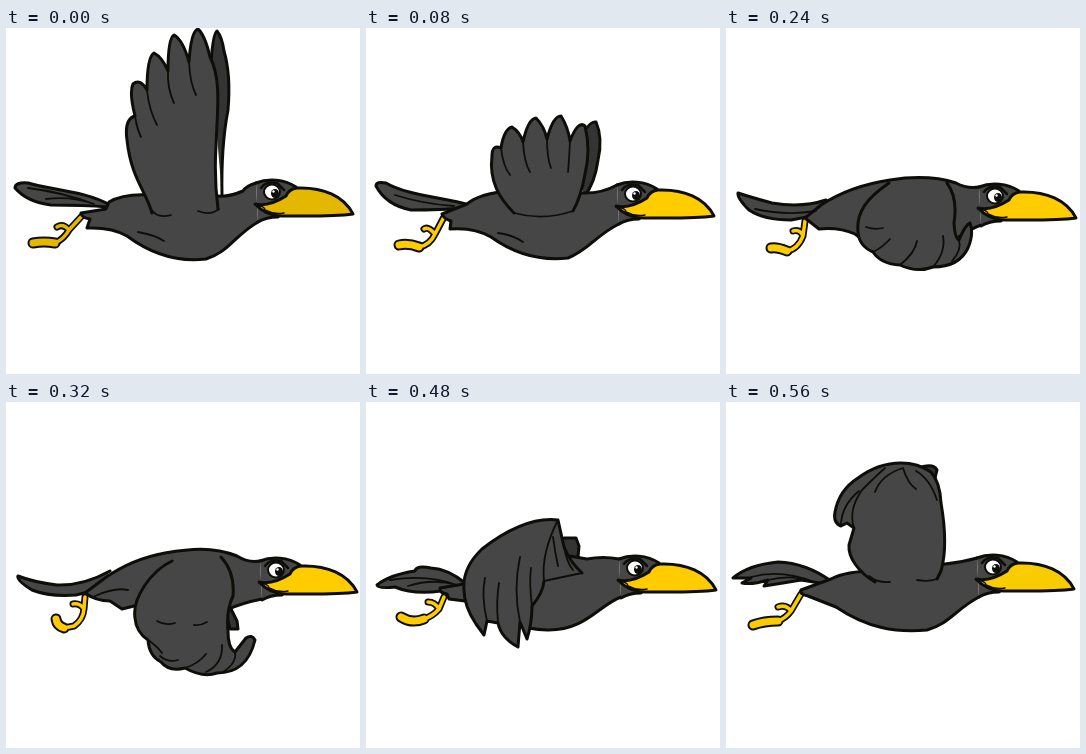
These frames come from a looping animation (354 by 346 pixels, 640 ms). An HTML page:

```html
<!DOCTYPE html>
<html lang="en">
<head>
<meta charset="utf-8">
<title>Flying crow</title>
<style>
  html, body { margin: 0; width: 100%; height: 100%; overflow: hidden; background: #fff; }
  svg { display: block; width: 100%; height: 100%; }
  path { stroke-linecap: round; stroke-linejoin: round; }
</style>
</head>
<body>
<svg id="stage" viewBox="0 0 354 346"></svg>
<script>
const STEP = 80, INK = '#0d0d09', PLUME = '#464646', SHADE = '#343434';

// Open outlines hide the joins between body parts; fills close them.
const poses = [
  { // wings fully raised
    head: [0, 0], beak: '#e5b800',
    far: 'M205 35Q207 5 211 3Q216 9 218 23Q225 47 222 82Q215 118 216 168',
    tail: 'M104 177C80 163 45 162 22 155Q9 154 9 160Q21 174 45 177Q78 177 102 179',
    body: 'M250 155Q240 158 237 163Q223 169 212 168L145 167Q118 165 103 174L100 181L75 185Q76 190 84 191L81 200Q106 199 121 208C148 228 175 234 200 231C223 224 228 208 252 194',
    wing: 'M146 185C140 163 125 150 121 112Q118 91 129 88Q123 64 127 56Q134 50 141 62Q141 29 148 25Q156 29 162 43Q162 10 168 7Q177 12 183 34Q185 3 192 1Q199 7 204 29C216 52 211 85 210 118Q208 150 212 181',
    lines: 'M141 62Q143 82 151 97M162 43Q161 60 168 75M183 34Q184 55 190 67M129 88Q131 101 135 109M145 181Q151 191 165 187M192 183Q204 188 213 181M22 160Q55 164 88 176M40 171Q65 168 88 176M132 204Q149 207 158 213',
    leg: 'M75 189L63 202Q57 195 51 199M63 202Q58 211 49 215', sole: 'M49 215Q38 213 27 215'
  },
  { // wings sweeping forward and down
    head: [1, 2], beak: '#fc0',
    far: 'M210 120Q222 92 230 94Q237 110 232 132Q229 155 218 169',
    tail: 'M104 177C75 169 40 167 20 155Q10 153 10 158Q20 177 45 182Q75 182 101 180',
    body: 'M251 157Q235 166 215 165L145 163Q114 165 101 176L76 186Q78 191 85 193L84 201Q108 199 125 209C150 227 175 233 202 230C223 222 230 207 253 196',
    wing: 'M148 185C133 170 123 153 126 128Q126 116 135 120Q138 101 146 99Q154 104 157 114Q162 91 170 90Q178 98 181 111Q187 88 195 88Q202 99 204 113Q212 92 219 98Q225 122 219 146Q215 169 207 183',
    lines: 'M135 120Q137 138 144 147M157 114Q158 134 164 144M181 111Q181 130 185 140M204 113Q203 134 202 144M148 185Q177 193 207 183M29 167Q57 176 88 178M132 205Q147 207 157 214',
    leg: 'M78 189L69 206Q62 198 58 201M69 206Q64 217 53 219', sole: 'M53 219Q42 215 33 217'
  },
  { // wings level, tips curled up
    head: [1, 4], beak: '#fc0',
    far: 'M205 165Q211 151 219 150Q224 156 223 166',
    tail: 'M98 174Q75 179 47 171Q25 163 14 154Q10 154 14 162Q24 177 37 184Q60 189 91 183',
    body: 'M251 159Q243 157 235 162L205 158Q165 152 135 159Q104 164 88 178L80 185Q77 190 83 193L92 200Q113 201 127 205C153 224 176 231 204 228C224 222 232 203 253 198',
    wing: 'M137 160Q128 170 137 180C160 195 188 192 211 187Q236 187 244 173Q247 155 241 148Q237 147 233 161Q229 151 220 150Q224 157 220 164Q216 150 207 150Q208 155 205 159C175 152 155 156 137 160',
    lines: 'M137 160Q131 168 143 174Q154 180 170 179M156 180Q181 174 185 157Q192 177 174 188M174 188Q204 178 205 158Q215 171 195 187M195 187Q219 178 220 164Q225 178 213 187M213 187Q232 180 233 161M146 169Q157 167 168 172M147 187Q162 193 181 192M26 174Q55 182 89 178',
    leg: 'M80 190L74 207Q70 200 64 202M74 207Q70 219 61 220', sole: 'M61 220Q50 217 40 218'
  },
  { // wings starting downward
    head: [3, 4], beak: '#fc0',
    far: 'M222 205Q231 211 232 223L224 224L220 207',
    tail: 'M100 172Q76 180 46 175Q24 169 12 165Q11 170 23 182Q38 192 65 192L91 187',
    body: 'M253 159Q241 161 230 155Q202 146 164 152Q124 158 95 177L79 190L93 201Q113 199 129 206C154 226 180 229 203 226C225 218 233 205 255 197',
    wing: 'M163 155C141 170 130 184 132 204Q133 218 147 224Q155 236 174 237Q191 245 207 239Q233 239 242 220Q248 206 244 195Q239 197 233 212Q229 211 228 195Q232 170 221 155',
    lines: 'M147 224Q157 219 164 211M174 237Q189 225 191 213M207 239Q220 224 217 208M226 233Q236 222 233 212M140 199Q149 202 157 200M29 181Q60 188 90 183',
    leg: 'M79 193L77 208Q74 201 67 203M77 208Q72 221 61 223', sole: 'M61 223Q51 219 45 220'
  },
  { // wings pushing down, tips trailing forward
    head: [4, 4], beak: '#fc0',
    far: 'M225 207L231 219L232 227L224 227L220 211',
    tail: 'M104 169Q77 184 51 183Q27 180 12 174Q10 178 26 188Q44 195 70 193L94 187',
    body: 'M254 159Q242 161 231 154C206 144 183 147 159 151Q126 157 99 176L79 191Q90 199 104 199L116 207L132 203L223 207Q236 201 256 197',
    wing: 'M166 159C145 169 126 196 129 216Q130 230 142 238Q143 254 155 260Q163 270 179 266Q197 276 211 271C229 271 243 263 249 238Q246 232 240 236L229 250Q222 246 222 229Q220 209 227 194Q229 170 215 155',
    lines: 'M142 238Q151 244 156 251M154 254Q162 261 172 258M179 266Q192 262 200 252M200 270Q217 262 216 243M217 270Q231 261 229 250M151 219Q159 224 169 221M188 223Q194 224 201 220M89 194Q109 185 122 188M223 207Q228 204 231 204',
    leg: 'M79 195L78 207Q74 201 67 202M78 207Q77 218 68 224L58 226', sole: 'M58 226Q51 224 50 217'
  },
  { // wings fully lowered
    head: [4, 2], beak: '#fc0',
    far: 'M221 205Q217 240 217 280Q227 279 228 285Q224 292 211 291L210 220',
    tail: 'M109 172Q80 172 54 174Q21 177 8 184Q8 190 25 190Q54 194 80 189L105 183',
    body: 'M254 157Q241 159 230 152C207 141 183 142 159 147Q126 152 108 172L81 187L77 193Q88 197 96 198L105 203L132 203L222 207Q237 196 256 195',
    wing: 'M166 158C140 174 137 191 130 207Q121 229 125 240L130 248Q120 261 129 269L137 274C132 298 140 314 153 328Q161 330 164 321Q172 331 184 340L190 333Q200 340 212 336Q224 330 222 325L211 325Q209 303 211 280Q216 240 220 207Q225 174 213 155',
    lines: 'M130 248Q137 250 143 257M137 274Q141 283 146 287M164 321Q162 303 164 293M190 333Q183 315 184 303M152 240Q160 244 166 241M23 184Q65 180 98 181M24 188Q72 188 99 181M222 207L231 204',
    leg: 'M77 195L76 208Q72 202 66 203M76 208Q70 218 60 222', sole: 'M60 222L45 227'
  },
  { // wings folding back up
    head: [3, 2], beak: '#fc0',
    far: 'M193 142L198 136L210 136L213 144L212 155L219 164L197 166',
    tail: 'M99 181Q82 167 65 166Q50 163 49 169Q23 173 11 183Q12 187 29 185Q48 193 75 189L101 186',
    body: 'M253 157Q237 154 221 157L180 150L104 181L74 186Q73 191 81 192L83 197L99 199C129 213 147 227 181 228C219 229 233 203 255 195',
    wing: 'M216 171Q204 160 198 145L192 118C166 115 138 130 116 147Q96 166 98 188Q98 204 110 222L118 233L121 219L132 221Q135 236 152 245L154 220L161 237Q166 221 166 204Q177 191 178 179',
    lines: 'M192 118Q175 151 178 179M187 135Q189 150 192 164M198 145Q201 161 207 168M121 219Q115 193 119 176M132 221Q130 199 133 181M154 220Q147 187 154 155M166 204Q163 181 165 166M178 179Q192 176 216 171M24 178Q61 172 91 183M42 184Q67 176 91 183',
    leg: 'M78 195L73 207Q69 200 62 200M73 207Q67 214 58 217', sole: 'M58 217Q46 222 35 215'
  },
  { // wings rising
    head: [1, 1], beak: '#f8cc00',
    far: 'M190 67Q207 60 211 68L208 80L192 74',
    tail: 'M105 179Q80 161 52 160Q22 163 7 176L25 176L16 181Q26 183 42 178L38 184L57 181L75 178L100 182',
    body: 'M251 156Q237 160 219 162L150 169Q120 169 105 177L75 188Q73 192 82 194L110 205C141 226 170 231 201 228C223 222 230 207 253 195',
    wing: 'M149 180C132 170 122 155 123 143L128 126L121 121L115 124Q107 121 109 110Q113 88 132 76Q152 61 175 61Q192 61 205 70Q214 80 215 101C219 124 221 148 215 169L211 177',
    lines: 'M115 122Q116 103 133 89M128 126Q122 108 136 88Q150 74 159 66M149 90Q155 73 177 66M177 66Q182 82 190 87M190 69Q204 77 211 98M143 174Q151 181 164 180M191 178Q202 180 211 177M25 175Q55 167 88 180M42 178Q66 172 88 180',
    leg: 'M75 192L65 209Q60 202 52 205M65 209Q60 216 52 219', sole: 'M52 219Q38 219 27 223'
  }
];

const shape = (d, fill, width = 3, stroke = INK) =>
  `<path d="${d}" fill="${fill}" stroke="${stroke}" stroke-width="${width}"/>`;
const line = (d, width, color) => shape(d, 'none', width, color);

const foot = ({ leg, sole, beak }) =>
  line(leg, 7) + line(sole, 11) + line(leg, 3.5, beak) + line(sole, 7, beak);

const head = ({ head: [x, y], beak }) => `<g transform="translate(${x} ${y})">
  ${shape('M250 155C262 150 278 151 290 159L285 175L272 189Q260 189 252 194', PLUME)}
  ${shape('M249 176Q263 179 280 168Q283 161 291 160C317 159 338 168 347 186C325 189 297 188 276 188Q260 188 249 176Z', beak)}
  ${line('M249 177Q259 178 259 182Q268 187 278 185', 1.5)}
  <ellipse cx="266" cy="164" rx="8" ry="7.5" fill="#fff" stroke="${INK}" stroke-width="2"/>
  <ellipse cx="269" cy="165.500" rx="4" ry="4.500" fill="${INK}"/>
  <circle cx="267.500" cy="163.500" r="1.200" fill="#fff"/>
  ${line('M255 160Q260 153 271 155L278 162', 2.5)}</g>`;

const stage = document.getElementById('stage');
stage.innerHTML = poses.map(pose => `<g visibility="hidden">${[
  shape(pose.far, SHADE),
  shape(pose.tail, PLUME),
  foot(pose),
  shape(pose.body, PLUME),
  head(pose),
  shape(pose.wing, PLUME),
  line(pose.lines, 1.8)
].join('')}</g>`).join('');

const views = [...stage.children];
function draw() {
  const current = Math.floor(performance.now() / STEP) % views.length;
  views.forEach((view, i) => view.setAttribute('visibility', i === current ? 'visible' : 'hidden'));
  requestAnimationFrame(draw);
}
draw();
</script>
</body>
</html>
```
